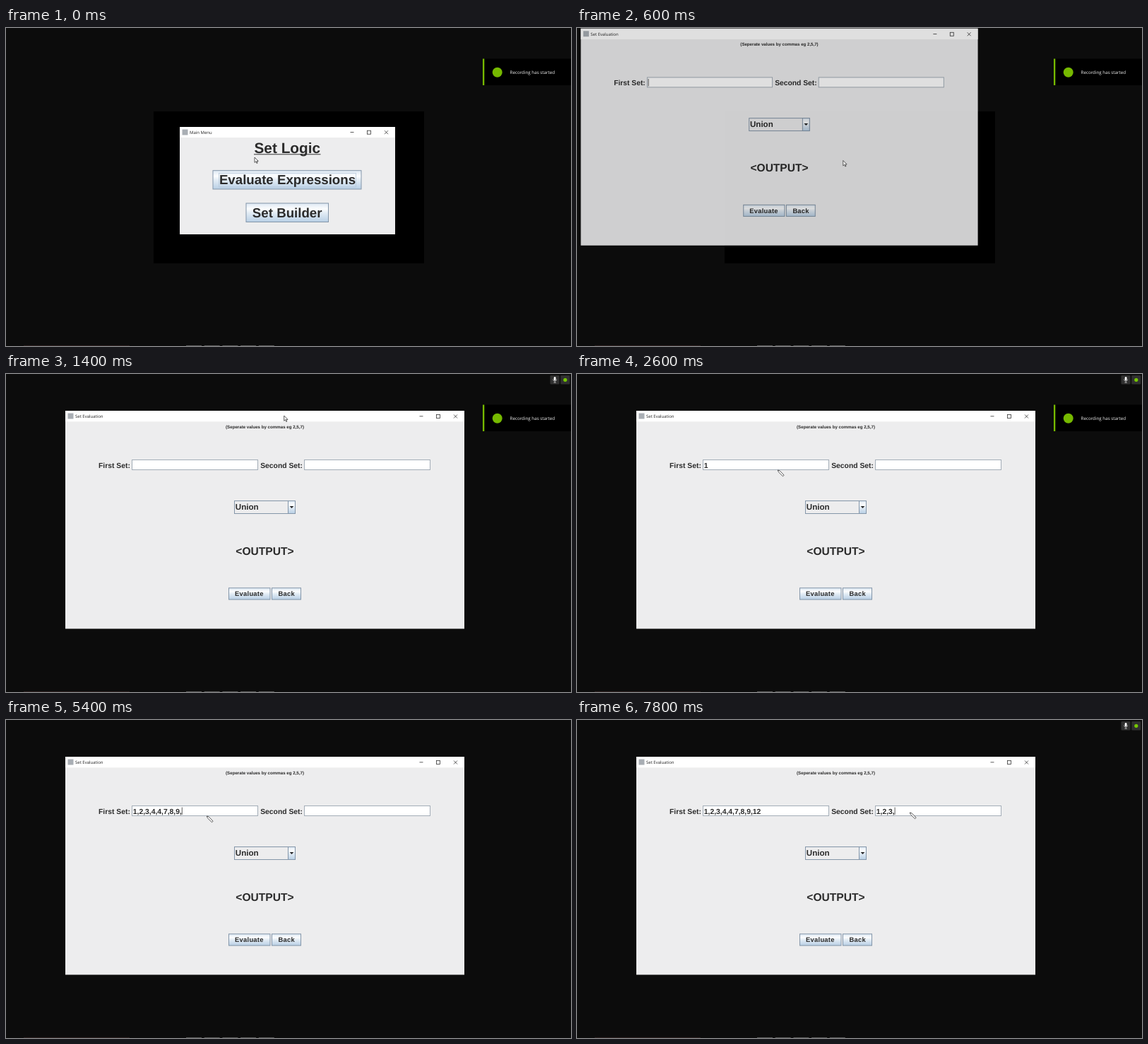
An HTML page that plays this animation: 800x450 px, repeating every 8 s.

```html
<!DOCTYPE html>
<html lang="en">
<head>
<meta charset="utf-8">
<title>Set Evaluation</title>
<style>
  html, body { margin: 0; width: 100%; height: 100%; overflow: hidden; background: #0c0c0c; }
  svg { display: block; width: 100%; height: 100%; }
  text { font: bold 10.35px "Liberation Sans", Arial, sans-serif; fill: #2b2b2b; white-space: pre; text-rendering: geometricPrecision; }
  .mid { text-anchor: middle; }
  .ui { font: 6px "Open Sans", sans-serif; fill: #222; }
  .small { font-size: 9.4px; letter-spacing: .25px; }
  .menu { font-size: 18.7px; }
  .button { fill: url(#metal); stroke: #8496a9; }
  .field { fill: #fff; stroke: #a3adb7; }
  .controls { fill: none; stroke: #333; stroke-width: .8; }
  .cursor { fill: #fff; stroke: #333; stroke-width: .8; stroke-linejoin: round; }
</style>
</head>
<body>
<svg viewBox="0 0 800 450">
  <defs>
    <linearGradient id="metal" x2="0" y2="1">
      <stop stop-color="#dde8f3"/>
      <stop offset=".3" stop-color="#fcfdfe"/>
      <stop offset=".5" stop-color="#e4edf5"/>
      <stop offset="1" stop-color="#b8cfe5"/>
    </linearGradient>
    <g id="controls" class="controls">
      <path d="M-63.5 7.5h5M-15 5.2l5 5m0-5l-5 5"/>
      <rect x="-39.5" y="5.2" width="5" height="5"/>
    </g>
    <rect id="appIcon" x="3.5" y="3.5" width="8" height="8" fill="#a9aeb4"/>
  </defs>

  <rect width="800" height="450" fill="#0c0c0c"/>
  <rect x="209" y="118" width="383" height="215" fill="#000"/>
  <path d="M25 449.5h150" stroke="#2c2020"/>
  <path d="M255 449.5h127" stroke="#555" stroke-dasharray="22 3.7"/>

  <g id="menu" transform="translate(246 140)">
    <rect width="305" height="152" fill="#ededee"/>
    <rect width="305" height="15" fill="#fff"/>
    <use href="#appIcon"/>
    <text class="ui" x="14" y="9.7">Main Menu</text>
    <use href="#controls" x="305"/>
    <text class="mid" x="152.3" y="37.2" style="font-size:20.8px">Set Logic</text>
    <path d="M105 38.8h94.5" stroke="#333"/>
    <rect class="button" x="47" y="61.7" width="210" height="26.3"/>
    <rect x="55.5" y="65.5" width="194" height="19.5" fill="none" stroke="#b4c6d9" stroke-width=".7"/>
    <text class="mid menu" x="152.5" y="81.3">Evaluate Expressions</text>
    <rect class="button" x="94" y="108" width="116.5" height="26.5"/>
    <text class="mid menu" x="152.2" y="127.8">Set Builder</text>
  </g>

  <g id="evaluation">
    <rect width="565" height="308.5" fill="#ededee"/>
    <rect width="565" height="15.3" fill="#fff"/>
    <use href="#appIcon"/>
    <text class="ui" x="14" y="10">Set Evaluation</text>
    <use href="#controls" x="565" y=".3"/>
    <text class="mid" x="282.5" y="24.7" style="font-size:6.17px">(Seperate values by commas eg 2,5,7)</text>
    <text x="47" y="80.5">First Set:</text>
    <rect class="field" x="94.5" y="69.5" width="178" height="14"/>
    <text x="276.2" y="80.5">Second Set:</text>
    <rect class="field" x="338.5" y="69.5" width="178" height="14"/>
    <text id="first" x="95.8" y="80.5"></text>
    <text id="second" x="339.8" y="80.5"></text>
    <rect id="caret" y="71.5" width=".8" height="10.5" fill="#333"/>
    <rect x="239.5" y="127.5" width="86" height="18" fill="#ededee" stroke="#8496a9"/>
    <rect class="button" x="315.5" y="127.5" width="10" height="18"/>
    <path d="M317.7 135h5.6l-2.8 3z" fill="#222"/>
    <text x="240.8" y="140.1" style="font-size:11.6px">Union</text>
    <text class="mid" x="282.5" y="203.6" style="font-size:15.6px">&lt;OUTPUT&gt;</text>
    <rect class="button" x="231.5" y="250.8" width="58.5" height="16.3"/>
    <text class="mid small" x="260.4" y="262.4">Evaluate</text>
    <rect class="button" x="292.5" y="250.8" width="41" height="16.3"/>
    <text class="mid small" x="313.2" y="262.4">Back</text>
  </g>

  <g id="notice">
    <rect x="675" y="43.5" width="125" height="37.5" fill="#000"/>
    <rect x="675" y="43.5" width="2.3" height="37.5" fill="#76b900"/>
    <circle cx="695.7" cy="62.7" r="7" fill="#76b900"/>
    <text class="ui" x="713.6" y="65.2" style="font-size:6.24px;fill:#f2f2f2">Recording has started</text>
  </g>

  <g id="status">
    <rect x="770.5" y="2" width="13" height="12.5" rx="1" fill="#303030"/>
    <rect x="785.3" y="2" width="13" height="12.5" rx="1" fill="#303030"/>
    <rect x="775.7" y="4" width="2.8" height="5.2" rx="1.4" fill="#fff"/>
    <path d="M774.6 7.5a2.5 2.5 0 0 0 5 0M777.1 10v2M775.4 12.2h3.4" fill="none" stroke="#ddd" stroke-width=".7"/>
    <circle cx="791.8" cy="8.3" r="2.6" fill="#76c800"/>
  </g>

  <path id="arrow" class="cursor" d="M0 0v7.4l1.8-1.6 1.2 2.7 1.2-.5-1.2-2.6h2.3z"/>
  <path id="pen" class="cursor" d="M0 0l2.8 .9 6 6.2-1.5 1.7-6.2-6z"/>
</svg>
<script>
const LOOP = 8000, STEP = 200;
const el = Object.fromEntries([...document.querySelectorAll("svg [id]")].map(e => [e.id, e]));

// [start ms, x, y, shape]
const pointer = [
  [0, 352, 183, "arrow"], [200, 368, 202, "arrow"], [400, 377, 208, "arrow"],
  [600, 376.8, 187.5, "arrow"], [800, 327.5, 38, "arrow"], [1000, 317, 14, "arrow"],
  [1200, 313.7, 7, "arrow"], [1400, 393.7, 59, "arrow"], [1600, 378, 76, "arrow"],
  [1800, 340, 106, "arrow"], [2000, 300, 128, "pen"], [2200, 284.3, 136, "pen"],
  [6200, 318, 134, "pen"], [6400, 392, 132, "arrow"], [6600, 450, 130, "pen"],
  [6800, 471.3, 131, "pen"]
];
// [start ms, number of typed characters]
const firstText = "1,2,3,4,4,7,8,9,12", secondText = "1,2,3,";
const firstTyped = [
  [0, 0], [2600, 1], [2800, 2], [3000, 4], [3200, 5], [3400, 7], [3600, 8],
  [3800, 9], [4000, 10], [4400, 11], [4600, 13], [4800, 15], [5000, 16], [5600, 17], [5800, 18]
];
const secondTyped = [[0, 0], [7200, 1], [7400, 3], [7600, 5], [7800, 6]];
const caretOwner = [
  [0, "first"], [1400, ""], [1800, "first"], [2400, ""], [2800, "first"],
  [4000, ""], [4400, "first"], [6200, ""], [6800, "second"]
];

const current = (track, t) => track.findLast(key => key[0] <= t);
const show = (node, on) => node.style.display = on ? "" : "none";

function draw(t) {
  const opening = t < 800;
  const [x, y] = t < 1400 ? [4, 0] : [84, 52];
  show(el.menu, t < 600);
  show(el.evaluation, t >= 600);
  el.evaluation.setAttribute("transform", `translate(${x} ${y})` +
    (opening ? " translate(282.5 154.3) scale(.995) translate(-282.5 -154.3)" : ""));
  el.evaluation.setAttribute("opacity", opening ? .87 : 1);

  el.first.textContent = firstText.slice(0, current(firstTyped, t)[1]);
  el.second.textContent = secondText.slice(0, current(secondTyped, t)[1]);
  const owner = el[current(caretOwner, t)[1]];
  show(el.caret, owner);
  if (owner) {
    const width = owner.textContent ? owner.getComputedTextLength() : 0;
    el.caret.setAttribute("x", +owner.getAttribute("x") + width);
  }

  show(el.notice, t < 5200);
  show(el.status, t >= 800 && (t < 5200 || t >= 6200));

  const [, px, py, shape] = current(pointer, t);
  for (const name of ["arrow", "pen"]) show(el[name], name === shape);
  el[shape].setAttribute("transform", `translate(${px} ${py})`);
}

const start = performance.now();
function tick() {
  const t = (performance.now() - start) % LOOP;
  draw(Math.floor(t / STEP) * STEP);
  requestAnimationFrame(tick);
}
tick();
</script>
</body>
</html>
```
